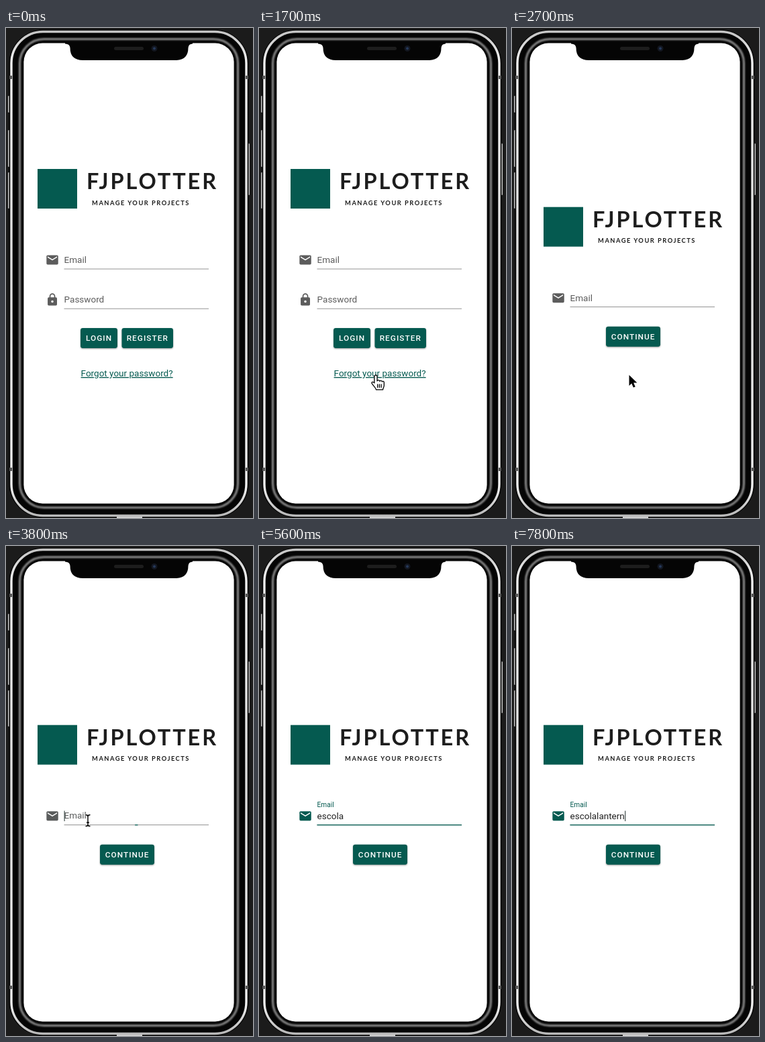
An HTML page that plays this animation: 368x730 px, repeating every 8000 ms.

```html
<!DOCTYPE html>
<html lang="en">
<head>
<meta charset="utf-8">
<title>Password recovery</title>
<style>
  :root { --teal: #055a50; --grey: #5c5c5c; --p: 0; }
  html, body { margin: 0; width: 100%; height: 100%; overflow: hidden; background: #1b1b1b; }
  svg { display: block; width: 100%; height: 100%; }
  text { font: 13.5px Roboto, sans-serif; white-space: pre; }
  .name { font: 700 32.5px Lato, sans-serif; letter-spacing: 2.9px; text-anchor: middle; fill: #1d1d1d; }
  .tag { font: 700 9.3px Lato, sans-serif; letter-spacing: 1.5px; text-anchor: middle; fill: #1d1d1d; }
  .button { filter: drop-shadow(0 1.5px 1.2px rgba(0, 0, 0, .38)); }
  .button rect { fill: var(--teal); }
  .button text { font-size: 11.8px; font-weight: 500; letter-spacing: 1.05px; fill: #fff; }
  .hint { fill: var(--grey); }
  .rule { fill: #949494; }
  .link { fill: var(--teal); text-decoration: underline; }
  .focus { fill: color-mix(in srgb, var(--teal) calc(var(--p) * 100%), var(--grey)); }
  .typed { fill: #212121; }
  .ring { fill: none; }
  .soft { filter: blur(.9px); }
  .pointer { stroke-linejoin: round; }
  .arrow { fill: #000; stroke: #fff; stroke-width: 2; paint-order: stroke; }
  .hand { fill: #fff; stroke: #000; stroke-width: 1.3; stroke-linecap: round; }
  .beam { fill: none; }
</style>
</head>
<body>
<svg viewBox="0 0 368 730" xmlns="http://www.w3.org/2000/svg">
  <defs>
    <linearGradient id="steel" x2="0" y2="1">
      <stop offset="0" stop-color="#c4c4c4"/>
      <stop offset=".06" stop-color="#f0f0f0"/>
      <stop offset=".5" stop-color="#dcdcdc"/>
      <stop offset=".94" stop-color="#f0f0f0"/>
      <stop offset="1" stop-color="#b8b8b8"/>
    </linearGradient>
    <path id="mail" d="M20 8l-8 5-8-5V6l8 5 8-5m0-2H4c-1.11 0-2 .89-2 2v12a2 2 0 0 0 2 2h16a2 2 0 0 0 2-2V6c0-1.11-.9-2-2-2z"/>
    <path id="lock" d="M12 17a2 2 0 0 0 2-2 2 2 0 0 0-2-2 2 2 0 0 0-2 2 2 2 0 0 0 2 2m6-9a2 2 0 0 1 2 2v10a2 2 0 0 1-2 2H6a2 2 0 0 1-2-2V10a2 2 0 0 1 2-2h1V6a5 5 0 0 1 5-5 5 5 0 0 1 5 5v2h1m-6-5a3 3 0 0 0-3 3v2h6V6a3 3 0 0 0-3-3z"/>
    <path id="beam" d="M-3.5-8.5Q0-8.5 0-6Q0-8.5 3.5-8.5M0-6.5V6.5M-3.5 8.5Q0 8.5 0 6Q0 8.5 3.5 8.5M-2 3H2"/>
    <g id="brand">
      <rect x="47" y="210" width="59" height="59" fill="#055a50"/>
      <text class="name" x="218" y="240">FJPLOTTER</text>
      <text class="tag" x="201" y="263.6">MANAGE YOUR PROJECTS</text>
    </g>
  </defs>

  <!-- phone -->
  <g fill="#c8c8c8">
    <rect x="3" y="101" width="2.6" height="25" rx="1.3"/>
    <rect x="3" y="152" width="2.6" height="55" rx="1.3"/>
    <rect x="3" y="215" width="2.6" height="54" rx="1.3"/>
    <rect x="360.4" y="172" width="2.6" height="77" rx="1.3"/>
  </g>
  <rect x="4.5" y="2.5" width="357" height="727" rx="51" fill="#050505"/>
  <rect class="ring" x="8" y="5.5" width="350" height="721" rx="47" stroke="url(#steel)" stroke-width="3.4"/>
  <rect class="ring soft" x="20.5" y="16.5" width="325" height="698" rx="36" stroke="#8e8e8e" stroke-width="3"/>
  <g fill="#555">
    <rect x="5" y="71" width="4" height="5"/><rect x="357" y="71" width="4" height="5"/>
    <rect x="5" y="655" width="4" height="5"/><rect x="357" y="655" width="4" height="5"/>
  </g>
  <rect x="165" y="728" width="38" height="2" fill="#d0d0d0"/>
  <rect x="24" y="20" width="318" height="691" rx="31" fill="#050505"/>
  <rect x="26.4" y="22.6" width="313.2" height="685.8" rx="28" fill="#fff"/>
  <path d="M88 21H278V23.5q-6 0-6.5 6 0 18.5-19 18.5H114.5q-19 0-19-18.5-.5-6-7.5-6Z" fill="#050505"/>
  <rect x="161" y="28" width="44" height="5" rx="2.5" fill="#1d1d1d"/>
  <circle cx="221" cy="30.5" r="4.5" fill="#131720"/>
  <circle cx="221" cy="30.5" r="2" fill="#26395a"/>

  <g id="login">
    <use href="#brand"/>
    <use href="#mail" class="hint" transform="translate(58.6 335) scale(.87)"/>
    <text class="hint" x="86.6" y="349.8">Email</text>
    <rect class="rule" x="86.5" y="358.5" width="215.5" height="1"/>
    <use href="#lock" class="hint" transform="translate(58.6 394.4) scale(.87)"/>
    <text class="hint" x="86.6" y="409">Password</text>
    <rect class="rule" x="86.5" y="417.7" width="215.5" height="1"/>
    <g class="button"><rect x="111" y="447" width="55" height="30" rx="3.4"/><text x="119" y="466.3">LOGIN</text></g>
    <g class="button"><rect x="172.5" y="447" width="76.5" height="30" rx="3.4"/><text x="179.7" y="466.3">REGISTER</text></g>
    <text class="link" x="111.6" y="519">Forgot your password?</text>
  </g>

  <g id="recover">
    <use href="#brand" y="56.7"/>
    <use href="#mail" class="focus" transform="translate(58.6 391.8) scale(.87)"/>
    <text id="label" class="focus">Email</text>
    <rect class="rule" x="86.5" y="415" width="215.5" height="1"/>
    <rect id="accent" y="414.9" height="1.4" fill="#055a50"/>
    <text id="typed" class="typed" x="86.6" y="406.8"></text>
    <rect id="caret" y="394.5" width="1" height="15.5" fill="#1c2b29"/>
    <g class="button"><rect x="140" y="444.7" width="81" height="30" rx="3.4"/><text x="147.8" y="463.8">CONTINUE</text></g>
  </g>

  <g id="pointer" class="pointer">
    <path class="arrow" d="M0 0v16l3.7-3.4 2.6 6 2.9-1.2-2.6-5.8h5.2Z"/>
    <path class="hand" d="M-2.2 1.5c0-3 4.2-3 4.2 0v6.5c.5-1.8 3.6-1.6 3.8.4.6-1.4 3.4-1.2 3.5.7.8-1.2 3-.6 3 1.2v4.5c0 2-1.6 3.5-1.8 6.2H.5C0 18-3.5 15.5-5.8 11.8-7 9.5-4.2 8.4-2.2 11ZM2.6 13v4.5M5.3 13v4.5M8 13v4.5"/>
    <g class="beam">
      <use href="#beam" stroke="#fff" stroke-width="3"/>
      <use href="#beam" stroke="#000" stroke-width="1.4"/>
    </g>
  </g>
</svg>

<script>
  const LOOP = 8000, TICK = 100;
  const SWITCH = 2400, FOCUS = 3800;
  const ENTRY = 'escolalantern';
  const KEYS = [4800, 4900, 5000, 5100, 5300, 5400, 6000, 6100, 6300, 6500, 6600, 6700, 6800];
  const CARET_ON = [[3800, 4300], [4800, 5600], [6000, 7300], [7800, LOOP]];
  const PATH = [ // time, x, y
    [400, 244, 661], [500, 198, 618], [700, 198, 618], [800, 188, 590], [1000, 178, 560],
    [1300, 177, 530], [1600, 174, 518], [2500, 174.5, 517], [2700, 174.5, 517],
    [2900, 158, 496], [3100, 124, 447], [3200, 125, 416], [3300, 126, 406], [3500, 122, 409],
    [4700, 122, 409]
  ];

  const $ = id => document.getElementById(id);
  const show = (el, on) => { el.style.display = on ? '' : 'none'; };
  const [arrow, hand, beam] = $('pointer').children;

  function pointAt(t) {
    const i = PATH.findIndex(k => k[0] > t);
    if (i < 1) return null;
    const [t0, x0, y0] = PATH[i - 1], [t1, x1, y1] = PATH[i];
    const f = (t - t0) / (t1 - t0);
    return [x0 + (x1 - x0) * f, y0 + (y1 - y0) * f];
  }

  function drawPointer(t) {
    const at = pointAt(t);
    show($('pointer'), at);
    if (!at) return;
    const overLink = t >= 1500 && t < 2500, overField = t >= 3200;
    show(hand, overLink);
    show(beam, overField);
    show(arrow, !overLink && !overField);
    $('pointer').setAttribute('transform', `translate(${at})`);
  }

  function drawField(t) {
    const x = Math.min(1, Math.max(0, (t - FOCUS + 2) / 300));
    const p = t < FOCUS ? 0 : 1 - (1 - x) ** 3;
    document.documentElement.style.setProperty('--p', p);
    $('label').setAttribute('transform', `translate(86.6 ${406.8 - 18.2 * p}) scale(${1 - p / 4})`);
    $('accent').setAttribute('x', 194.25 - 107.75 * p);
    $('accent').setAttribute('width', 215.5 * p);

    const text = ENTRY.slice(0, KEYS.filter(k => k <= t).length);
    $('typed').textContent = text;
    show($('caret'), CARET_ON.some(([a, b]) => t >= a && t < b));
    $('caret').setAttribute('x', 86.6 + (text ? $('typed').getComputedTextLength() + .4 : 0));
  }

  const start = performance.now();
  function draw(now) {
    const t = Math.floor(Math.max(0, now - start) % LOOP / TICK) * TICK;
    show($('login'), t < SWITCH);
    show($('recover'), t >= SWITCH);
    if (t >= SWITCH) drawField(t);
    drawPointer(t);
    requestAnimationFrame(draw);
  }
  draw(start);
</script>
</body>
</html>
```
